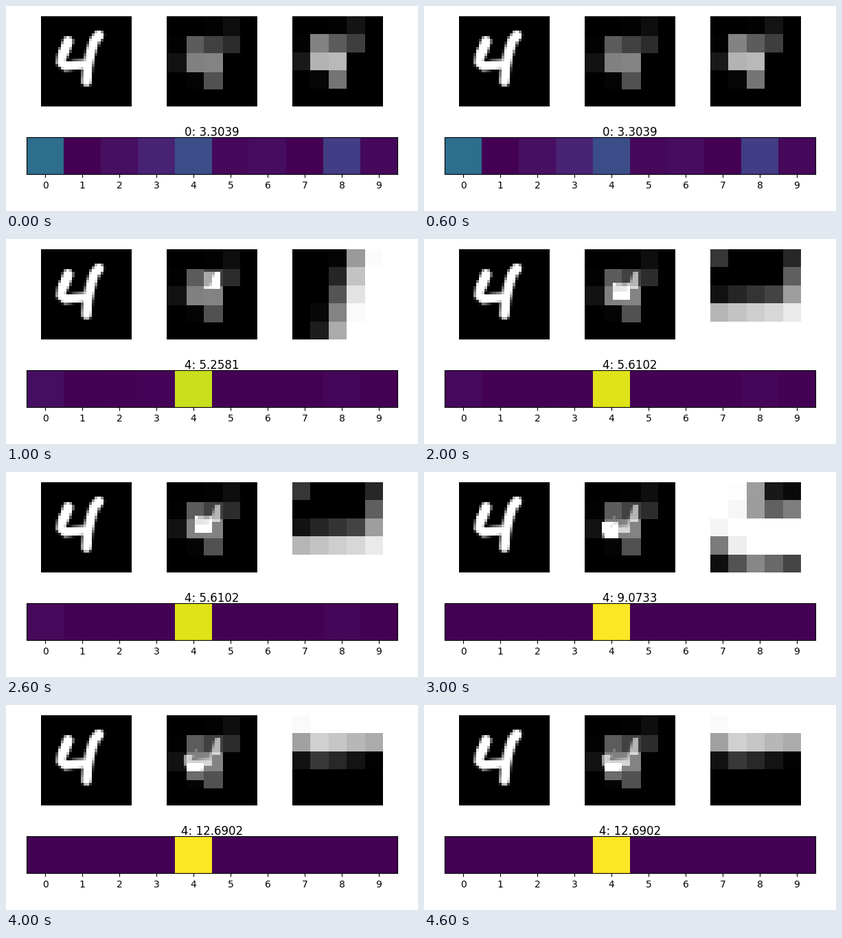
Write a matplotlib script that moves like this. It is 600 by 300 pixels and loops after 5000 ms.

```python
import numpy as np
import matplotlib.pyplot as plt
from matplotlib.animation import FuncAnimation
from matplotlib.transforms import Bbox

W, H, DPI = 600, 300, 100
SIDE = 131.99                    # just under 132 so no pixel is added
N, PATCH, VIEW = 32, 6, 5
CELL = 132 / N

# Pen lines of the digit in panel pixels: radius, points
PEN = [(7.8, [(39.5, 37), (36, 47), (31.5, 56)]),
       (6.9, [(30.5, 57), (29, 67), (36, 73.5), (50, 71.5), (67, 70)]),
       (7.3, [(84, 28), (78, 36), (72, 55), (68, 75), (66.3, 95)])]

LOOKS = [(13, 8), (10, 12), (6, 14), (7, 17)]   # column, row of each close look
FIRST = np.array([.36, 0, .04, .1, .24, .022, .035, 0, .18, .022])
SURE = [FIRST[4], .92, .95, 1, 1]               # belief in a four
SCORES = [3.3039, 5.2581, 5.6102, 9.0733, 12.6902]


def stroke(radius, points, soft=4):
    """Soft-edged pen line sampled on the N x N grid."""
    c = (np.arange(N) + .5) * CELL
    x, y = np.meshgrid(c, c)
    dist = np.full((N, N), 1e3)
    for (ax, ay), (bx, by) in zip(points, points[1:]):
        dx, dy = bx - ax, by - ay
        t = ((x - ax) * dx + (y - ay) * dy) / (dx * dx + dy * dy)
        t = np.clip(t, 0, 1)
        dist = np.minimum(dist, np.hypot(x - ax - t * dx, y - ay - t * dy))
    return np.clip((radius - dist) / soft + .5, 0, 1)


def shrink(img):
    """Area average of a square image down to VIEW x VIEW."""
    n = len(img)
    cell, src = np.arange(VIEW)[:, None] * n / VIEW, np.arange(n)
    overlap = np.minimum(cell + n / VIEW, src + 1) - np.maximum(cell, src)
    weight = np.clip(overlap, 0, 1) * VIEW / n
    return weight @ img @ weight.T


def window(look):
    col, row = look
    return np.s_[row:row + PATCH, col:col + PATCH]


DIGIT = np.max([stroke(*line) for line in PEN], axis=0)
VIEWS = [shrink(DIGIT)] + [shrink(DIGIT[window(p)]) for p in LOOKS]
IDX = np.arange(N) * VIEW // N
BLUR = .71 * VIEWS[0][np.ix_(IDX, IDX)]


def memory(step):
    """Blurred scene with earlier looks dimmed and the current one lit."""
    out = BLUR.copy()
    for k, look in enumerate(LOOKS[:step], 1):
        w = window(look)
        d, b = DIGIT[w], BLUR[w]
        out[w] = b + .4 + d if k == step else b * (1 - .5 * d) + .58 * d
    return np.clip(out, 0, 1)


def belief(step):
    """Mass not given to the four is shared like the first guess."""
    rest = FIRST.copy()
    rest[4] = 0
    p = rest / rest.sum() * (1 - SURE[step])
    p[4] = SURE[step]
    return p


def caption(step):
    return f"{belief(step).argmax()}: {SCORES[step]:.4f}"


def panel(x, y, w, h):
    ax = fig.add_axes([0, 0, 1, 1], label=f"panel {x}")
    ax.set_position(Bbox.from_extents(x / W, 1 - (y + h) / H,
                                      (x + w) / W, 1 - y / H))
    return ax


def picture(x, data):
    ax = panel(x, 15, SIDE, 132)
    ax.axis("off")
    return ax.imshow(data, cmap="gray", vmin=0, vmax=1,
                     interpolation="nearest", aspect="auto")


fig = plt.figure(figsize=(W / DPI, H / DPI), dpi=DPI, facecolor="white")
picture(51, DIGIT)
scene = picture(234, memory(0))
glance = picture(417, VIEWS[0])

bar = panel(30, 192, 540, 54)
probs = bar.imshow([belief(0)], cmap="viridis", vmin=0, vmax=1,
                   interpolation="nearest", aspect="auto")
bar.set_xticks(range(10))
bar.set_yticks([])
title = fig.text(.5, 1 - 190 / H, caption(0), fontsize=12,
                 ha="center", va="baseline")


def update(step):
    scene.set_data(memory(step))
    glance.set_data(VIEWS[step])
    probs.set_data([belief(step)])
    title.set_text(caption(step))
    return scene, glance, probs, title


anim = FuncAnimation(fig, update, frames=len(SCORES), interval=1000,
                     repeat=True, repeat_delay=0, blit=False)
plt.show()
```
